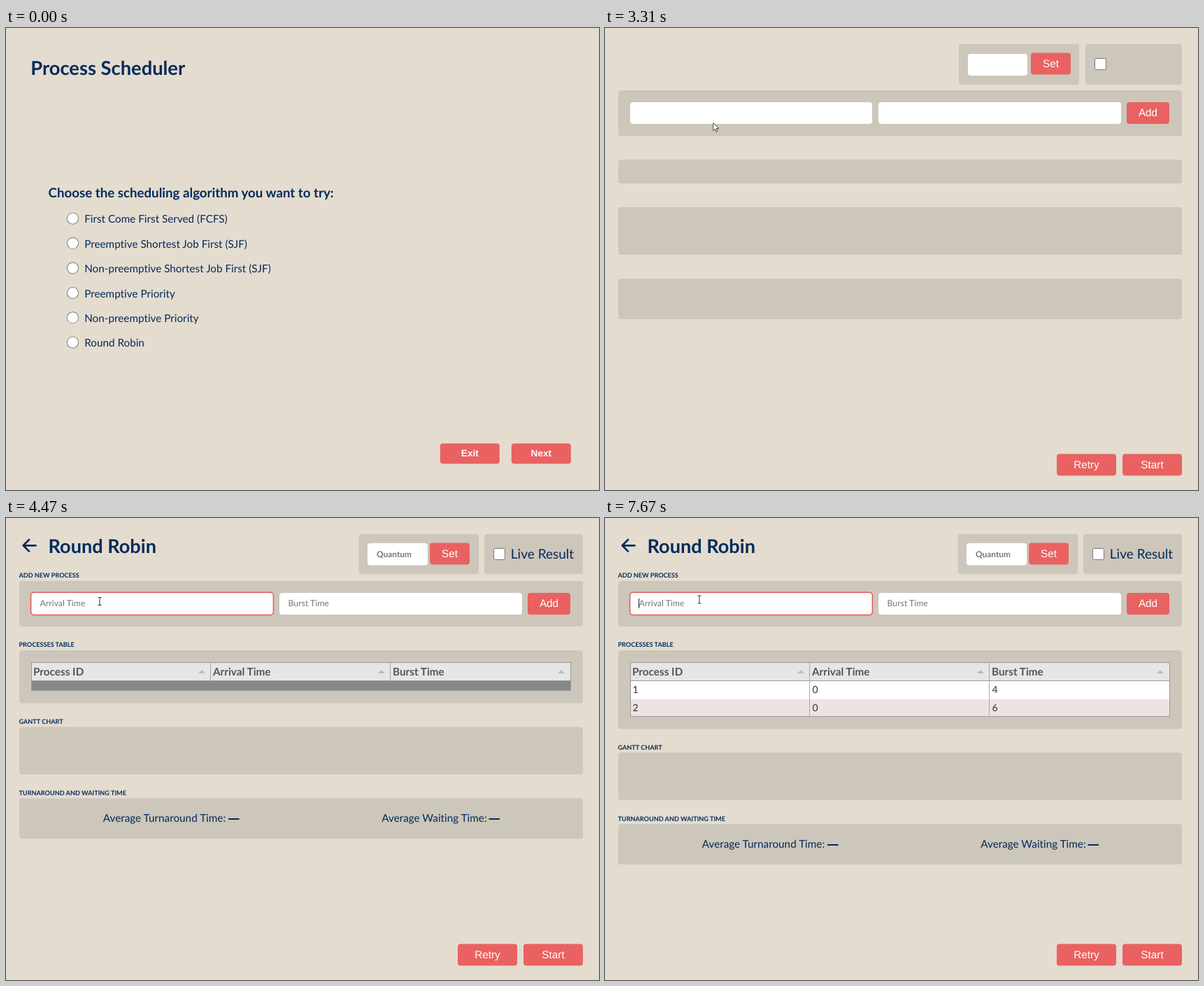
Animation of 848x660 px, one loop 8000 ms. Source, as an HTML page with a canvas:

```html
<!DOCTYPE html>
<html lang="en">
<head>
<meta charset="utf-8">
<title>Process Scheduler</title>
<style>
html, body { margin: 0; width: 100%; height: 100%; overflow: hidden; background: #e4dccf; }
canvas { display: block; }
</style>
</head>
<body>
<canvas id="stage" width="848" height="660"></canvas>
<script>
const ctx = document.getElementById('stage').getContext('2d');
const LOOP = 8000;
const BG = '#e4dccf', PANEL = '#cdc6ba', NAVY = '#002b5b', RED = '#ea5455', SOFT_RED = '#e96261';
const LATO = 'Lato, sans-serif', ARIAL = '"Liberation Sans", Arial, sans-serif';

// Fractional glyph positions; any letter spacing turns ligatures off.
ctx.textRendering = 'geometricPrecision';
ctx.letterSpacing = '0.01px';

const ARROW = new Path2D('M0 0V11l2.6-2.4 1.9 4.2 1.7-.8-1.9-4.1H8z');
const HAND = new Path2D('M-1.5 7V.5a1.4 1.4 0 0 1 2.8 0V5l5.5 1.4q1.4.4 1.2 2l-.8 4.1q-.4 2-2 2H.6q-1 0-1.6-1L-5 8q-.8-1.6.6-1.8 1.2 0 2.9 2z');

const OPTIONS = [
  'First Come First Served (FCFS)',
  'Preemptive Shortest Job First (SJF)',
  'Non-preemptive Shortest Job First (SJF)',
  'Preemptive Priority',
  'Non-preemptive Priority',
  'Round Robin'
];

// Pointer moves: start, end, number of steps, control points.
const MOVES = [
  [300, 730, 7, [[447, 595], [300, 470], [143, 408]]],
  [990, 1750, 12, [[132, 400], [-60, 330], [60, 170], [95, 449]]],
  [1870, 2570, 11, [[95, 449], [420, 500], [763, 603.5]]],
  [2760, 3380, 10, [[763, 603.5], [420, 330], [139, 124]]],
  [3650, 4060, 6, [[139, 124], [145, 104], [134, 119]]],
  [7400, 7670, 4, [[134, 119], [134, 118], [135, 116.5]]]
];

// What the form holds from each moment on: focused field, arrival, burst, rows, caret.
const FORM = [
  [0, '', '', '', 0, 0],
  [3970, 'a', '', '', 0, 1],
  [4470, 'a', '', '', 0, 0],
  [4610, 'a', '0', '', 0, 1],
  [4810, 'b', '0', '', 0, 1],
  [5150, 'b', '0', '4', 0, 1],
  [5340, 'b', '', '', 1, 1],
  [5740, 'a', '', '', 1, 1],
  [6140, 'a', '0', '', 1, 1],
  [6610, 'b', '0', '', 1, 1],
  [6870, 'b', '0', '6', 1, 1],
  [7000, 'b', '', '', 2, 1],
  [7400, 'a', '', '', 2, 1]
];

const lastBefore = (list, t) => list.filter(e => e[0] <= t).pop();

function rect(x0, y0, x1, y1, color) {
  ctx.fillStyle = color;
  ctx.fillRect(x0, y0, x1 - x0, y1 - y0);
}

function box(x0, y0, x1, y1, color, r = 4, border, width = 1.5) {
  ctx.beginPath();
  ctx.roundRect(x0, y0, x1 - x0, y1 - y0, r);
  ctx.fillStyle = color;
  ctx.fill();
  if (border) {
    ctx.lineWidth = width;
    ctx.strokeStyle = border;
    ctx.stroke();
  }
}

// y is the middle of the capital letters.
function text(str, x, y, size, { color = NAVY, weight = 400, font = LATO, align = 'left' } = {}) {
  ctx.font = `${weight} ${size}px ${font}`;
  ctx.fillStyle = color;
  ctx.textAlign = align;
  ctx.fillText(str, x, y + size * 0.358);
}

function button(label, x0, y0, x1, y1, { bold = false, hover = false } = {}) {
  box(x0, y0, x1, y1, hover ? RED : SOFT_RED);
  text(label, (x0 + x1) / 2, (y0 + y1) / 2 - 0.5, bold ? 13.57 : 15.26,
    { color: '#fff', weight: bold ? 700 : 400, font: ARIAL, align: 'center' });
}

function disc(x, y, r, color) {
  ctx.beginPath();
  ctx.arc(x, y, r, 0, 2 * Math.PI);
  ctx.fillStyle = color;
  ctx.fill();
}

function radio(x, y, on) {
  disc(x, y, 8.5, on ? RED : '#767676');
  disc(x, y, 7.6, '#fff');
  if (on) disc(x, y, 5.1, RED);
}

function along(points, p) {
  while (points.length > 1) {
    points = points.slice(1).map(([x, y], i) => [
      points[i][0] + (x - points[i][0]) * p,
      points[i][1] + (y - points[i][1]) * p
    ]);
  }
  return points[0];
}

function pointerAt(t) {
  if (t < 300 || (t >= 800 && t < 990)) return null;
  const [start, end, steps, points] = lastBefore(MOVES, t);
  const done = Math.min(steps, Math.floor((t - start) / (end - start) * (steps - 1) + 0.05) + 1);
  const p = done / steps;
  return along(points, p * p * (3 - 2 * p));
}

const inside = (pos, x0, y0, x1, y1) =>
  !!pos && pos[0] >= x0 && pos[0] <= x1 && pos[1] >= y0 && pos[1] <= y1;

function drawPointer([x, y], kind) {
  ctx.save();
  ctx.translate(x, y);
  ctx.lineJoin = 'round';
  if (kind === 'text') {
    ctx.strokeStyle = '#333';
    ctx.lineWidth = 1;
    ctx.stroke(new Path2D('M-2.5 -5.5H2.5M0 -5.5V5.5M-2.5 5.5H2.5'));
  } else {
    const shape = kind === 'hand' ? HAND : ARROW;
    ctx.fillStyle = '#fff';
    ctx.fill(shape);
    ctx.strokeStyle = '#333';
    ctx.lineWidth = 0.9;
    ctx.stroke(shape);
  }
  ctx.restore();
}

function chooser(t, pos) {
  text('Process Scheduler', 35.2, 57.2, 27.3, { weight: 700 });
  text('Choose the scheduling algorithm you want to try:', 60.6, 235.8, 18.68, { weight: 700 });
  OPTIONS.forEach((name, i) => {
    const y = 272.2 + 35.4 * i;
    radio(95.5, y, i === 5 && t >= 1870);
    text(name, 112.2, y + 0.8, 15.26);
  });
  const overExit = inside(pos, 621, 593.5, 706, 622.5);
  const overNext = inside(pos, 723, 593.5, 808, 622.5);
  button('Exit', 620.8, 593.5, 705.8, 622.5, { bold: true, hover: overExit });
  button('Next', 722.8, 593.5, 807.8, 622.5, { bold: true, hover: overNext });
  if (pos) drawPointer(pos, overExit || overNext ? 'hand' : 'arrow');
}

function footer() {
  button('Retry', 646, 608.5, 731, 639.5);
  button('Start', 740, 608.5, 825, 639.5);
}

function checkbox(x) {
  box(x + 0.5, 43.5, x + 16.5, 59.5, '#fff', 2, '#767676', 1);
}

// The page before its lettering has loaded.
function bareForm() {
  box(506, 23, 678, 81, PANEL);
  box(519, 37, 604, 68, '#fff');
  button('Set', 609, 35.5, 666, 66.5);
  box(687, 23, 825, 81, PANEL);
  checkbox(700);
  box(19, 89, 825, 154.5, PANEL);
  box(36, 106, 382, 137, '#fff');
  box(391, 106, 738, 137, '#fff');
  button('Add', 746, 106, 807, 137);
  box(19, 188, 825, 222, PANEL);
  box(19, 256, 825, 324, PANEL);
  box(19, 358, 825, 416, PANEL);
  footer();
}

function field(x0, x1, hint, value, focused, caret) {
  if (focused) box(x0 - 0.4, 106.2, x1 + 0.4, 138.5, '#fff', 4.5, RED);
  else box(x0, 107, x1, 138, '#fff');
  const x = x0 + 12.5;
  text(value || hint, x, 122, 12.25, { color: value ? '#111' : '#757575' });
  if (focused && caret) {
    const end = value ? x + ctx.measureText(value).width : x;
    rect(Math.floor(end), 115, Math.floor(end) + 1, 129, '#222');
  }
}

function caption(str, y) {
  text(str, 18.4, y, 9.1, { weight: 700 });
}

function table(rows) {
  const rowTop = r => Math.round(233 + 25.6 * r);
  const bottom = rows ? rowTop(rows) : 247;
  rect(36, 206, 808, bottom, '#999');
  rect(37, 207, 807, 232, '#e6e6e6');
  rect(37, 233, 807, bottom - 1, '#888');
  const data = [['1', '0', '4'], ['2', '0', '6']].slice(0, rows);
  data.forEach((row, r) => {
    rect(37, rowTop(r), 807, Math.min(rowTop(r + 1), bottom - 1), r ? '#ede3e3' : '#fff');
  });
  ['Process ID', 'Arrival Time', 'Burst Time'].forEach((name, i) => {
    const x = 36 + 257 * i, edge = x + 256;
    text(name, x + 3, 219.6, 15.26, { color: '#555', weight: 700 });
    ctx.fillStyle = '#bbb';
    ctx.fill(new Path2D(`M${edge - 17} 222h10l-5 -5z`));
    if (i < 2) rect(edge, 207, edge + 1, rows ? bottom : 232, '#aaa');
    data.forEach((row, r) => text(row[i], x + 3.5, 245 + 25.8 * r, 14, { color: '#333' }));
  });
}

function backArrow() {
  ctx.strokeStyle = NAVY;
  ctx.lineWidth = 2.7;
  ctx.lineCap = ctx.lineJoin = 'round';
  ctx.stroke(new Path2D('M42.5 39.3H25M33 31L24.7 39.3L33 47.6'));
  ctx.lineCap = 'butt';
}

function form(t) {
  const [, focus, arrival, burst, rows, caret] = lastBefore(FORM, t);
  const dy = [0, 11.5, 36.8][rows];

  backArrow();
  text('Round Robin', 60.6, 40.2, 27.1, { weight: 700 });
  box(504.5, 23, 676, 80, PANEL);
  box(517, 36, 603, 67.5, '#fff');
  text('Quantum', 555, 52, 11.87, { color: '#757575', weight: 700, align: 'center' });
  button('Set', 606, 35.5, 663, 66.5);
  box(684, 23, 825, 80, PANEL);
  checkbox(697);
  text('Live Result', 767, 51.6, 19, { align: 'center' });

  caption('ADD NEW PROCESS', 82);
  box(19, 90, 825, 155, PANEL);
  field(36, 382, 'Arrival Time', arrival, focus === 'a', caret);
  field(391, 738, 'Burst Time', burst, focus === 'b', caret);
  button('Add', 746, 107, 807, 138);

  caption('PROCESSES TABLE', 181.2);
  box(19, 189, 825, 264.5 + dy, PANEL);
  table(rows);

  caption('GANTT CHART', 290.7 + dy);
  box(19, 298.5 + dy, 825, 366.3 + dy, PANEL);

  caption('TURNAROUND AND WAITING TIME', 392.7 + dy);
  box(19, 400.5 + dy, 825, 458.3 + dy, PANEL);
  text('Average Turnaround Time:', 226.5, 428.8 + dy, 15.26, { align: 'center' });
  text('Average Waiting Time:', 612.5, 428.8 + dy, 15.26, { align: 'center' });
  const dash = Math.round(429 + dy);
  rect(318, dash, 333.5, dash + 2, NAVY);
  rect(690.5, dash, 706, dash + 2, NAVY);
  footer();
}

function draw(t) {
  rect(0, 0, 848, 660, BG);
  const pos = pointerAt(t);
  if (t < 2830) return chooser(t, pos);
  if (t < 3450) bareForm();
  else form(t);
  drawPointer(pos, t < 3520 ? 'arrow' : 'text');
}

const begin = performance.now();
function tick() {
  draw((performance.now() - begin) % LOOP);
  requestAnimationFrame(tick);
}
tick();
</script>
</body>
</html>
```
